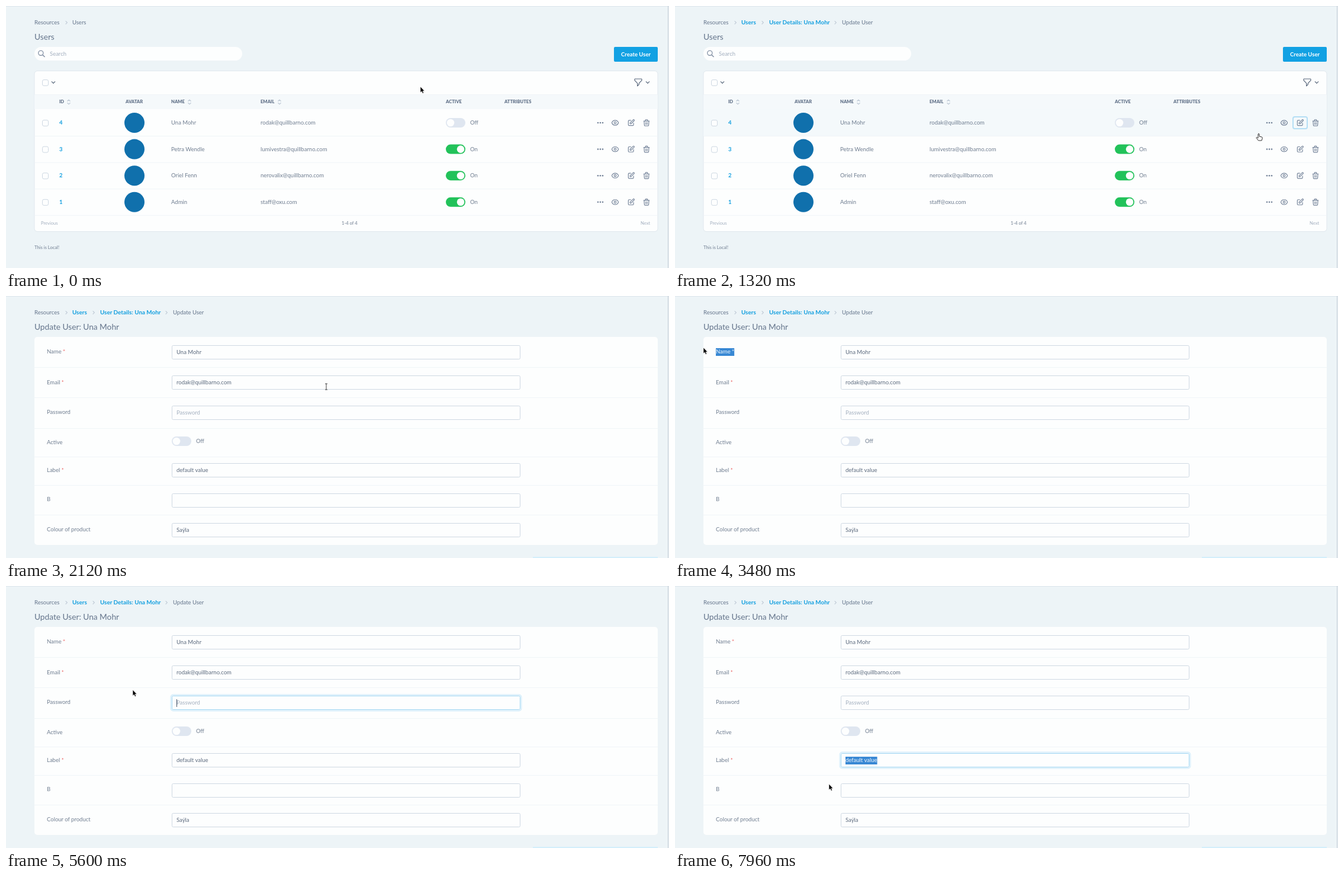
These frames come from a looping animation (1120x442 px, 8 s). An HTML page:

```html
<!DOCTYPE html>
<html lang="en">
<head>
<meta charset="utf-8">
<title>Users</title>
<style>
html, body { margin: 0; width: 100%; height: 100%; overflow: hidden; background: #edf4f7; }
svg { display: block; }
text { font: 9.5px Lato, sans-serif; fill: #6f7d90; white-space: pre; }
.title { font-size: 13.7px; fill: #64748b; }
.crumb { fill: #64748b; }
.link { font-weight: 700; fill: #129fdf; }
.trail { font-size: 9.9px; }
.head { font-size: 7.6px; font-weight: 900; fill: #64748b; }
.small { font-size: 7.6px; }
.pale { fill: #a3afbf; }
.button { font-weight: 700; fill: #fff; text-anchor: middle; }
.required { fill: #ea5a5a; }
.value { fill: #5b697d; }
.selected, .selected .required { fill: #f2f8fd; }
.callout { font: 700 36px "Open Sans", "Noto Sans", sans-serif; fill: #000; }
.icon { fill: none; stroke-linecap: round; stroke-linejoin: round; }
</style>
</head>
<body>
<svg id="stage" width="1120" height="442" viewBox="0 0 1120 442"></svg>
<script>
const LOOP = 8000;
const PERSON = 'Una Mohr';
const MAIL = '@quillbarno.com';
const CARD = '#fdfefe', BORDER = '#cfd9e3', SLATE = '#75849a', DARK = '#56657a', FAINT = '#bfcad6', SELECTION = '#3888d4';
const users = [
  [4, PERSON, 'rodak' + MAIL],
  [3, 'Petra Wendle', 'lumivestra' + MAIL],
  [2, 'Oriel Fenn', 'nerovalix' + MAIL],
  [1, 'Admin', 'staff@oxu.com']
];
// label, middle of the label, top of the input, value, placeholder
const fields = [
  ['Name', 94, 83, PERSON],
  ['Email', 146, 134, users[0][2]],
  ['Password', 196, 185, '', 'Password'],
  ['Active', 247],
  ['Label', 294, 282, 'default value'],
  ['B', 343, 333, ''],
  ['Colour of product', 394, 383, 'Saýla']
];
const icons = {
  search: 'M21 21l-6-6m2-5a7 7 0 11-14 0 7 7 0 0114 0z',
  filter: 'M3 4a1 1 0 011-1h16a1 1 0 011 1v2.6l-7 7.4v3l-4 4v-7L3 6.6z',
  eye: 'M15 12a3 3 0 11-6 0 3 3 0 016 0zM2.5 12C3.7 8 7.5 5 12 5s8.3 3 9.5 7c-1.2 4-5 7-9.5 7s-8.3-3-9.5-7z',
  edit: 'M11 5H6a2 2 0 00-2 2v11a2 2 0 002 2h11a2 2 0 002-2v-5m-1.4-9.4a2 2 0 112.8 2.8L11.8 15H9v-2.8z',
  trash: 'M19 7l-.9 12.1A2 2 0 0116.1 21H7.9a2 2 0 01-2-1.9L5 7m5 4v6m4-6v6m1-10V4a1 1 0 00-1-1h-4a1 1 0 00-1 1v3M4 7h16',
  down: 'M6 9l6 6 6-6',
  right: 'M9 5l7 7-7 7',
  sort: 'M6 8l6-6 6 6M6 16l6 6 6-6'
};

const text = (x, y, s, cls = '', attrs = '') => `<text x="${x}" y="${y}" class="${cls}" ${attrs}>${s}</text>`;
const rect = (x, y, w, h, fill, r = 0, attrs = '') =>
  `<rect x="${x}" y="${y}" width="${w}" height="${h}" rx="${r}" fill="${fill}" ${attrs}/>`;
const line = y => rect(48, y, 1053, 1, '#f0f5f8');
const group = (id, body) => `<g id="${id}">${body}</g>`;
const icon = (name, x, y, size = 14, stroke = SLATE) =>
  `<path class="icon" d="${icons[name]}" stroke="${stroke}" stroke-width="${28 / size}"
    transform="translate(${x - size / 2} ${y - size / 2}) scale(${size / 24})"/>`;
const separator = x => icon('right', x, 28, 8, FAINT);
const checkbox = y => rect(61.5, y - 5.5, 10, 10, CARD, 2.5, `stroke="${BORDER}"`);
const toggle = (x, y, on) => rect(x, y, 33, 16, on ? '#22c25a' : '#dfe6f0', 8) +
  `<circle cx="${x + (on ? 25 : 8)}" cy="${y + 8}" r="6.3" fill="${CARD}"/>` +
  text(x + 41, y + 11, on ? 'On' : 'Off');

function tableRow([id, name, mail], i) {
  const y = 197 + i * 44.6;
  return checkbox(y + 1) + text(90, y + 3, id, 'link') +
    `<circle cx="217" cy="${y}" r="17" fill="#1070ac"/>` +
    text(279, y + 3, name) + text(430, y + 3, mail) + toggle(743, y - 8, i > 0) +
    [1000, 1004, 1008].map(x => `<circle cx="${x}" cy="${y}" r="1.3" fill="${SLATE}"/>`).join('') +
    icon('eye', 1029, y) + icon('edit', 1056, y) + icon('trash', 1082, y) + line(y + 22);
}

function listPage() {
  const heads = [[90, 'ID', 106], [202, 'AVATAR'], [279, 'NAME', 310], [430, 'EMAIL', 462], [743, 'ACTIVE'], [842, 'ATTRIBUTES']];
  return text(48, 56.5, 'Users', 'title') +
    rect(48, 69, 351, 23, CARD, 11.5) + icon('search', 60, 80.5, 14) + text(74, 83.5, 'Search', 'pale') +
    rect(1027, 69, 74, 25, '#12a1e3', 2) + text(1064, 84.5, 'Create User', 'button') +
    rect(48, 109.5, 1053, 271, CARD, 5, 'stroke="#e0e8ee"') +
    checkbox(130) + icon('down', 80, 129, 11, DARK) +
    icon('filter', 1068, 129, 16, DARK) + icon('down', 1084, 129, 11, DARK) +
    rect(48, 149, 1053, 25, '#f5f9fb') + line(149) +
    heads.map(([x, s, sortX]) => text(x, 164, s, 'head') + (sortX ? icon('sort', sortX, 162, 9, FAINT) : '')).join('') +
    rect(48, 174, 1053, 45, '#f4f9fb', 0, 'id="hover"') +
    users.map(tableRow).join('') +
    rect(1044, 187, 24, 20, 'none', 3, 'id="ring" stroke="#b5dff5" stroke-width="2"') +
    text(59, 369, 'Previous', 'small pale') + text(567, 369, '1-4 of 4', 'small') + text(1072, 369, 'Next', 'small pale') +
    text(48, 410, 'This is Local!', 'small');
}

function formField([label, mid, top, value, placeholder], i) {
  const star = [0, 1, 4].includes(i) ? ' <tspan class="required">*</tspan>' : '';
  const input = top === undefined ? toggle(280, 237, false) :
    rect(280.5, top + .5, 588, 23, CARD, 2, `id="box${i}" stroke="${BORDER}"`) +
    rect(288, top + 6, 0, 13, SELECTION, 0, `id="mark${i}"`) +
    text(288, top + 15.3, value || placeholder || '', value ? 'value' : 'pale', `id="value${i}"`);
  return text(69, mid + 3.3, label + star, '', `id="label${i}"`) + input;
}

const formPage = () => text(48, 56.5, 'Update User: ' + PERSON, 'title') +
  rect(48, 69, 1053, 351, CARD, 5) +
  [120, 171, 223, 271, 319, 369].map(line).join('') +
  rect(69, 88, 0, 13, SELECTION, 0, 'id="labelMark"') +
  rect(278.5, 0, 592, 27, 'none', 4, 'id="glow" stroke="#d9effb" stroke-width="2"') +
  fields.map(formField).join('') +
  rect(288, 191, 1, 13, '#475569', 0, 'id="caret"') +
  rect(890, 440, 211, 2, '#d3eefb');

const callout = () => rect(795, 9, 313, 64, '#ececec', 4, 'stroke="#666" filter="url(#shadow)"') +
  text(822, 55, 'Enter Pressed!', 'callout') +
  '<path d="M908 18L706 78" stroke="#f00" stroke-width="6"/><path d="M656 93L704 60 713 95z" fill="#f00"/>';

const pointers = {
  arrow: '<path d="M0 0v10l2.3-2 1.5 3.4 1.8-.8-1.5-3.2H7z" fill="#000" stroke="#fff" stroke-width=".6"/>',
  hand: '<path d="M-1 5V-2q1-1.5 2 0v4l4.5 1q1 .5.5 3l-1 3H-.5L-4 4.5q0-1.5 1.4-.8z" fill="#fff" stroke="#333"/>',
  beam: '<path d="M-2-5h4M0-5V5M-2 5h4" fill="none" stroke="#444"/>'
};

document.getElementById('stage').innerHTML =
  `<filter id="shadow" x="-10%" y="-30%" width="120%" height="160%">
    <feDropShadow dx="0" dy="0" stdDeviation="3" flood-color="#333" flood-opacity=".8"/></filter>` +
  rect(0, 0, 1120, 1, '#dde6ec') + rect(1118, 0, 1, 442, '#c3ccd5') +
  text(48, 31, 'Resources', 'crumb') + separator(102) +
  group('shortTrail', text(112, 31, 'Users', 'crumb')) +
  group('longTrail', text(112, 31, 'Users', 'link trail') + separator(148) +
    text(159, 31, 'User Details: ' + PERSON, 'link trail') + separator(271) +
    text(282, 31, 'Update User', 'crumb')) +
  group('list', listPage()) + group('form', formPage()) + group('callout', callout()) +
  group('pointer', Object.entries(pointers).map(([id, shape]) => group(id, shape)).join(''));

const el = id => document.getElementById(id);
const show = (id, on) => { el(id).style.display = on ? '' : 'none'; };

// time, x, y
const path = [
  [0, 700, 136], [40, 700, 136], [760, 1056, 197], [1080, 1056, 197], [1320, 986, 218],
  [2120, 541, 153], [2520, 322, 118], [2800, 74, 385], [2960, 74, 338], [3080, 48, 87],
  [3200, 50, 300], [3320, 50, 300], [3480, 48, 87], [3680, 48, 87], [3800, 50, 340],
  [4040, 50, 340], [4280, 320, 96], [4400, 320, 96], [4600, 342, 117], [4880, 342, 117],
  [5520, 214, 175], [6560, 218, 186], [7400, 258, 330], [7960, 260, 334], [LOOP, 260, 334]
];

function pointerAt(t) {
  const i = path.findIndex(p => p[0] > t);
  const [t0, x0, y0] = path[i - 1], [t1, x1, y1] = path[i];
  const u = (t - t0) / (t1 - t0), k = u * u * (3 - 2 * u);
  return [x0 + (x1 - x0) * k, y0 + (y1 - y0) * k];
}

// focused field from each moment on
const focusSteps = [[0, -1], [4320, 0], [4960, 1], [5400, 2], [6800, 4]];

function selectText(textId, markId, on) {
  el(textId).classList.toggle('selected', on);
  el(markId).setAttribute('width', on ? el(textId).getComputedTextLength() : 0);
}

function draw(now) {
  const t = Math.floor(now % LOOP / 40) * 40;
  const [x, y] = pointerAt(t);
  const form = t >= 1720, trail = t >= 1120;
  const overRow = !form && y > 175;
  const overInput = form && x > 280 && x < 869 && fields.some(f => y > f[2] && y < f[2] + 24);
  const focus = focusSteps.filter(s => s[0] <= t).pop()[1];

  show('shortTrail', !trail);
  show('longTrail', trail);
  show('list', !form);
  show('form', form);
  show('hover', overRow);
  show('ring', t >= 880);
  show('callout', t >= 4320 && t < 5080);
  show('caret', focus === 2 && (t - 5400) % 1000 < 500);
  show('glow', focus >= 0);
  if (focus >= 0) el('glow').setAttribute('y', fields[focus][2] - 1.5);

  selectText('label0', 'labelMark', t >= 3080 && t < 3720);
  fields.forEach((f, i) => {
    if (f[2] === undefined) return;
    el('box' + i).setAttribute('stroke', i === focus ? '#9fd5f2' : BORDER);
    selectText('value' + i, 'mark' + i, i === focus && f[3] !== '');
  });

  show('hand', overRow);
  show('beam', overInput);
  show('arrow', !overRow && !overInput);
  el('pointer').setAttribute('transform', `translate(${x} ${y})`);
  requestAnimationFrame(() => draw(performance.now() - start));
}
const start = performance.now();
draw(0);
</script>
</body>
</html>
```
